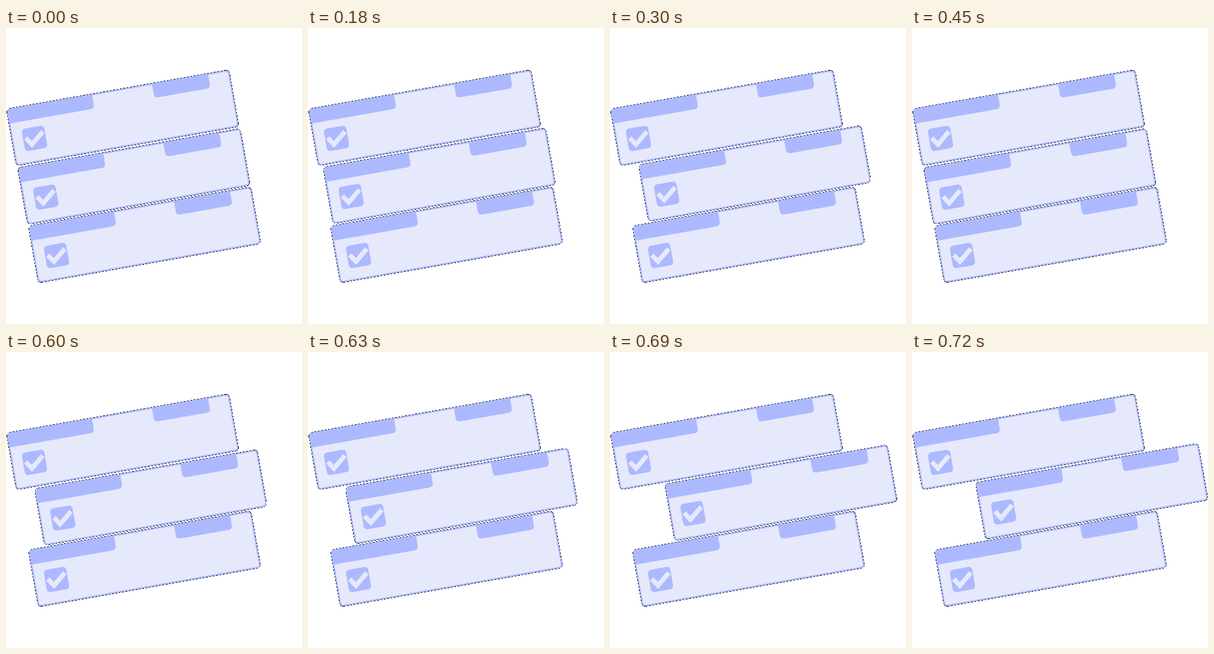
An HTML page that plays this animation: 500 by 500 pixels, repeating every 1.83 s.

```html
<!DOCTYPE html>
<html lang="en">
<head>
<meta charset="utf-8">
<title>Sliding cards</title>
<style>
  html, body { margin: 0; width: 100%; height: 100%; overflow: hidden; background: #fff; }
  svg { display: block; width: 100%; height: 100%; }
</style>
</head>
<body>
<svg viewBox="0 0 500 500">
  <defs>
    <!-- Hard outline: faintly covered edge pixels turn black, the rest stay solid -->
    <filter id="matte" filterUnits="userSpaceOnUse" x="0" y="0" width="500" height="500" color-interpolation-filters="sRGB">
      <feComponentTransfer in="SourceAlpha" result="edge">
        <feFuncA type="linear" slope="20" intercept="-1"/>
      </feComponentTransfer>
      <feComponentTransfer in="SourceGraphic" result="body">
        <feFuncA type="linear" slope="20" intercept="-10"/>
      </feComponentTransfer>
      <feMerge><feMergeNode in="edge"/><feMergeNode in="body"/></feMerge>
    </filter>
    <g id="card" fill="#adb9ff">
      <rect width="381.8" height="97.4" rx="6"/>
      <rect x="2.5" y="2.5" width="376.8" height="92.4" rx="3.5" fill="#e6e9fb"/>
      <path d="M1 5q0-4 4-4H146.7V18.2q0 7-7 7H1z"/>
      <path d="M249.5 1H345.8V18.2q0 7-7 7H256.5q-7 0-7-7z"/>
      <rect x="19.1" y="38" width="38.4" height="38.4" rx="6"/>
      <path d="M23.9 53.8L32.3 66.4L54.1 48.4" fill="none" stroke="#e6e9fb" stroke-width="7.8"/>
    </g>
  </defs>
  <g filter="url(#matte)">
    <use href="#card" transform="translate(.55 136.8) rotate(-10)"/>
    <use href="#card" id="slider"/>
    <use href="#card" transform="translate(37.7 334.6) rotate(-10)"/>
  </g>
</svg>
<script>
  const LOOP = 1830, STEP = 30;
  const slider = document.getElementById('slider');
  // [time in ms, distance along the card]: nudge out, back, out again, then slide
  const keys = [[0, 0], [150, 0], [300, 29], [450, 0], [600, 29], [720, 89], [LOOP, 89]];

  function distance(t) {
    const i = keys.findIndex(([end]) => t < end);
    const [t0, d0] = keys[i - 1], [t1, d1] = keys[i];
    return d0 + (d1 - d0) * (t - t0) / (t1 - t0);
  }

  function draw() {
    const t = Math.floor(performance.now() % LOOP / STEP) * STEP;
    slider.setAttribute('transform', `translate(19.6 236) rotate(-10) translate(${distance(t)} 0)`);
    requestAnimationFrame(draw);
  }
  draw();
</script>
</body>
</html>
```
